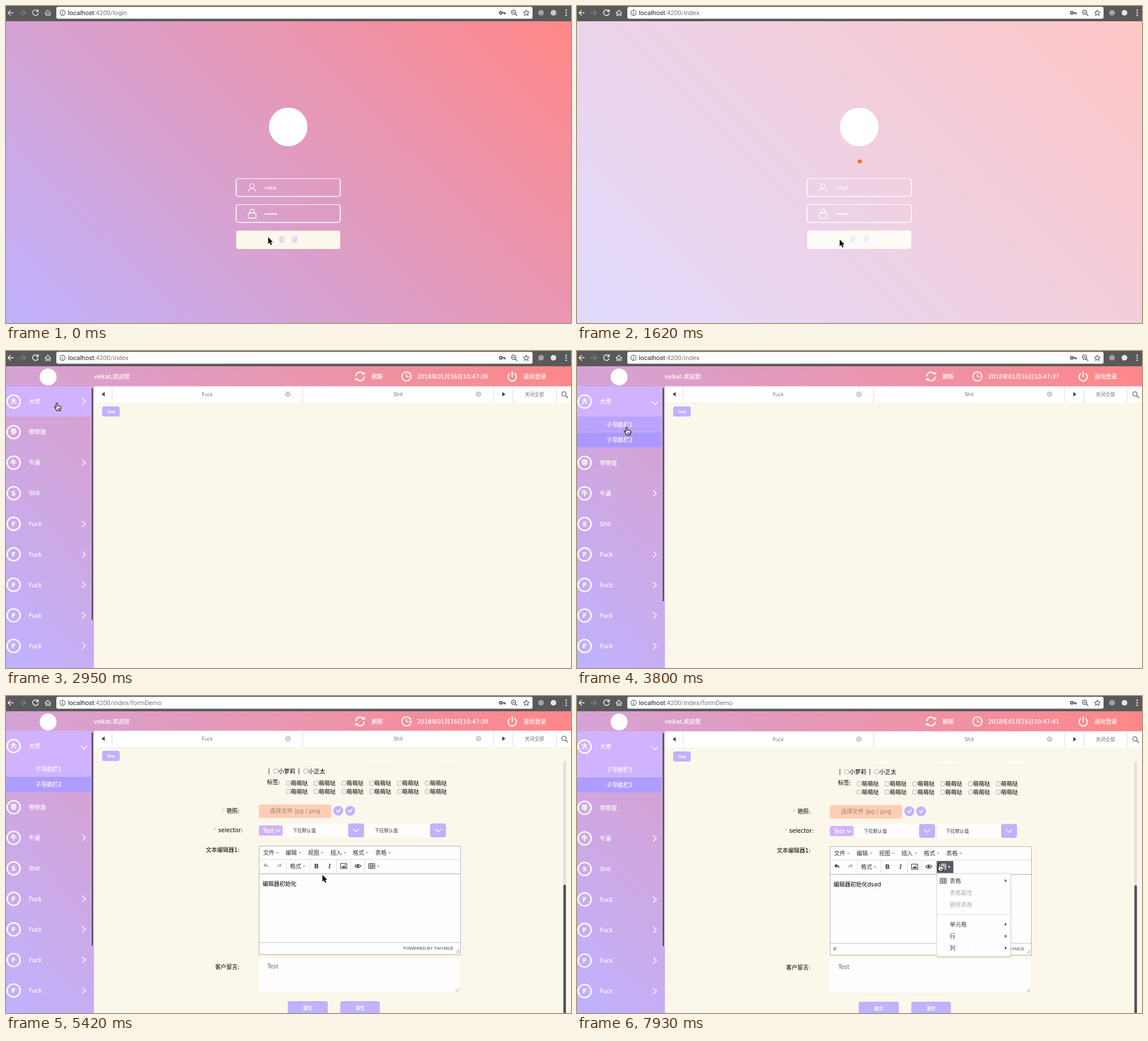
Animation, 999 px wide and 561 px high, one loop 8 s. Source, as an HTML page:

```html
<!DOCTYPE html>
<html lang="zh">
<head>
<meta charset="utf-8">
<title>Admin demo</title>
<style>
html, body { margin: 0; width: 100%; height: 100%; overflow: hidden; }
svg { display: block; width: 999px; height: 561px; }
text { font: 10px "DejaVu Sans", "Noto Sans CJK SC", "Noto Sans CJK", sans-serif; white-space: pre; }
.w { fill: #fff; font-weight: 500; stroke: #fff; stroke-width: .22px; }
.b { font-weight: 700; }
.c { text-anchor: middle; }
.e { text-anchor: end; }
.tab { font-size: 8.6px; fill: #777; }
.s { font: 8.2px "Liberation Sans", "Noto Sans CJK SC", Arial, sans-serif; fill: #666; }
.btn { font: 500 8px "Liberation Sans", "Noto Sans CJK SC", Arial, sans-serif; fill: #fff; text-anchor: middle; stroke: #fff; stroke-width: .25px; }
.url { font: 11.4px Roboto, sans-serif; fill: #222; }
.l { fill: none; stroke-linecap: round; stroke-linejoin: round; }
</style>
</head>
<body>
<svg id="stage" viewBox="0 0 999 561"></svg>
<script>
const USER = 'velkat', PURPLE = '#bfb2ff', CREAM = '#fcf7eb', LIGHT = '#d1b2ff';

const text = (x, y, s, cls = '', more = '') => `<text x="${x}" y="${y}" class="${cls}" ${more}>${s}</text>`;
const rect = (x, y, w, h, fill, r = 0, more = '') =>
  `<rect x="${x}" y="${y}" width="${w}" height="${h}" rx="${r}" fill="${fill}" ${more}/>`;
const dot = (x, y, r, fill, more = '') => `<circle cx="${x}" cy="${y}" r="${r}" fill="${fill}" ${more}/>`;
const line = (d, color, w = 1, more = '') => `<path class="l" d="${d}" stroke="${color}" stroke-width="${w}" ${more}/>`;
const fill = (d, color) => `<path d="${d}" fill="${color}"/>`;
const group = (id, body, more = '') => `<g id="${id}" ${more}>${body}</g>`;
const at = (x, y, body) => `<g transform="translate(${x} ${y})">${body}</g>`;
const vline = (x, y, h, color = '#ddd') => rect(x, y, 1, h, color);

/* Browser bar */
const browserBar = () => rect(0, 0, 999, 27, '#5a595a') +
  group('nav',
    line('M13 12H4M8 7.5L3.5 12 8 16.5', '#f0f0f0', 1.4) +
    line('M56 8.5A5 5 0 1 0 57 13M57 6.5V10H53.5', '#f0f0f0', 1.5) +
    line('M69 12.5L74 7.5 79 12.5M70.5 12V17H73V13.5H75.5V17H78V12', '#f0f0f0', 1.2) +
    dot(968, 12, 5, '#e4e4e4')) +
  line('M25 12H34M30 7.5L34.5 12 30 16.5', '#858585', 1.4) +
  rect(89, 1.5, 842, 21, '#fff', 3) +
  dot(100, 12, 4.6, 'none', 'stroke="#555" stroke-width="1.1"') + line('M100 11.5V14.5M100 9.4V9.6', '#555', 1.2) +
  text(109.5, 16, 'localhost<tspan id="path" fill="#777"></tspan>', 'url') +
  dot(875, 12, 2.2, 'none', 'stroke="#555" stroke-width="2"') + line('M878 12H882.5V14M880.5 12V14', '#555', 1.7) +
  dot(897.5, 11, 3.8, 'none', 'stroke="#555" stroke-width="1.3"') + line('M900.5 14L903.5 17M896 11H899', '#555', 1.4) +
  line('M920 7L921.5 10.5 925 10.8 922.3 13.2 923.2 16.8 920 14.9 916.8 16.8 917.7 13.2 915 10.8 918.5 10.5Z', '#555', 1.1) +
  dot(946, 12, 5, '#a3a3a3') +
  [7.5, 12, 16.5].map(y => dot(990.5, y, 1.4, '#ddd')).join('');

/* Login page */
const field = y => rect(407, y, 184, 31.5, 'none', 4, 'stroke="#fff" stroke-width="1.2"');
const login = () => dot(499, 214, 34, '#fff') +
  field(305.5) + field(351.5) +
  dot(435, 318.5, 4, 'none', 'stroke="#fff" stroke-width="1.2"') + line('M428.5 328C429 321.5 441 321.5 441.5 328', '#fff', 1.2) +
  rect(428.5, 366.5, 13.5, 9, 'none', 1.5, 'stroke="#fff" stroke-width="1.3"') + line('M431.5 366V363.5A3.6 3.6 0 0 1 439 363.5V366', '#fff', 1.3) +
  text(457, 324.8, USER, 's', 'style="fill:#fff"') +
  [0, 1, 2, 3, 4, 5].map(i => dot(459 + 3.7 * i, 368, 1.5, '#fff')).join('') +
  rect(407, 397.5, 184, 32.5, CREAM, 4) +
  ['登', '录'].map((s, i) => text(487.5 + 23 * i, 418, s, 'c', `style="font-size:11.5px;font-weight:500" fill="${PURPLE}"`)).join('') +
  rect(0, 27, 999, 534, '#fff', 0, 'id="veil"') +
  dot(499, 214, 34, '#fff') + field(305.5) + field(351.5) +
  dot(500, 275, 3.6, '#ff6a13', 'id="loader"');

/* Header of the index page */
const header = () => dot(74.5, 46, 15, '#fff') +
  text(155, 48.6, '<tspan id="user"></tspan>,欢迎您', 'w') +
  group('tools',
    at(626, 45, line('M-7.5-1A7.5 7.5 0 0 1 6-4.5M7.5 1A7.5 7.5 0 0 1-6 4.5', CREAM, 2.2) +
      fill('M3-3.5H9V-8.5ZM-3 3.5H-9V8.5Z', CREAM)) +
    text(646.5, 48.6, '刷新', 'w') +
    at(708, 45, dot(0, 0, 8, 'none', `stroke="${CREAM}" stroke-width="2.1"`) + line('M0-4V.5H4', CREAM, 1.7))) +
  text(727, 48.6, '', 'w', 'id="date"') +
  at(895, 45.5, line('M-4.5-5.5A7.3 7.3 0 1 0 4.5-5.5M0-8.5V0', CREAM, 2.2)) +
  text(915, 48.6, '退出登录', 'w');

/* Sidebar */
const menu = ['大佬', '带带我', '牛逼', 'Shit', 'Fuck', 'Fuck', 'Fuck', 'Fuck', 'Fuck'];
const item = (name, i) => {
  const y = 89.5 + 54.05 * i;
  return dot(13.5, y, 11.5, 'none', 'stroke="#fff" stroke-width="2.4"') +
    text(13.5, y + 3.9, name[0], 'w b c', 'style="font-size:10.8px"') +
    text(40.5, y + 3.8, name, 'w') +
    (i === 1 || i === 3 ? '' : line(`M135 ${y - 5}L140.5 ${y}L135 ${y + 5}`, '#fff', 1.4, i ? '' : 'id="chev"'));
};
const sidebar = () => rect(0, 62.5, 150, 53.5, LIGHT, 0, 'id="hot"') +
  item(menu[0], 0) +
  group('sub',
    rect(0, 116, 150, 27.5, LIGHT, 0, 'id="row1"') + rect(0, 143.5, 150, 27.5, LIGHT, 0, 'id="row2"') +
    line('M0 143.5H150', '#fff', .8, 'stroke-dasharray="1 2.5" opacity=".6"') +
    text(52, 133.6, '子导航栏1', 'w') + text(52, 161, '子导航栏2', 'w'), 'clip-path="url(#subClip)"') +
  group('rest', menu.slice(1).map((s, i) => item(s, i + 1)).join('')) +
  rect(150.7, 64.7, 3.8, 412, '#5d4a6c', 1.9, 'id="sideBar" stroke="#fff" stroke-width=".7"');

/* Tab strip and page body */
const closeIcon = x => dot(x, 76.5, 5, '#ccc') + line(`M${x - 1.7} 74.8l3.4 3.4m0-3.4l-3.4 3.4`, '#fff', 1);
const tabs = () => rect(155.5, 62.5, 844, 28.5, '#fff') + rect(155.5, 91, 844, 475, CREAM) +
  fill('M174.5 72.5V80.5L169 76.5Z', '#444') + fill('M877.5 72.5V80.5L883 76.5Z', '#444') +
  [187, 861.5, 896, 972.5].map(x => vline(x, 63, 28)).join('') +
  group('tabNames', text(356, 79.8, 'Fuck', 'tab c') + text(693.5, 79.8, 'Shit', 'tab c')) +
  group('tabExtras', closeIcon(498.5) + closeIcon(835.5) + vline(524, 63, 28)) +
  text(934.5, 80, '关闭全部', 'tab c') +
  dot(986.5, 76, 3.8, 'none', 'stroke="#888" stroke-width="1.7"') + line('M989.5 79L993 82.5', '#888', 2) +
  button(170, 98, 31, 18, 'Test', 110);

/* Form */
const button = (x, y, w, h, s, base) => rect(x, y, w, h, PURPLE, 3.5) + text(x + w / 2, base || y + h / 2 + 2.8, s, 'btn');
const label = (y, s, star, end = 413) =>
  text(end, y + 3.7, (star ? `<tspan fill="${PURPLE}">* </tspan>` : '') + s + ':', 'e', 'style="font-weight:500"');
const input = (x, y, w, s = 'Test', pad = 15) => rect(x, y, w, 24.5, '#fffefd', 3) + text(x + pad, y + 15.2, s, 's');
const check = (x, y, s, dx = 4.5) => rect(x - 3.7, y - 3.7, 7.4, 7.4, '#f3f3f3', 1.5, 'stroke="#aaa" stroke-width=".9"') + text(x + dx, y + 3.7, s);
const bar = (x, y) => text(x, y + 3.5, '|', 'c');
const down = (x, y, k = 5, color = '#fff') => line(`M${x - k} ${y - k / 2}l${k} ${k}l${k} ${-k}`, color, 1.3);
const caret = (x, y, color = '#aaa') => fill(`M${x - 2.5} ${y - 1.2}h5l-2.5 2.6z`, color);
const gridIcon = (x, y, id = '') => `<path ${id} class="l" stroke="#444" d="M${x - 5} ${y - 4.5}h10.5v9h-10.5zm0 3h10.5m-10.5 3h10.5m-7-6v9m3.5-9v9"/>`;
const grip = (x, y) => line(`M${x} ${y}l-6 6m6-3l-3 3`, '#888', .9);

const formTop = () => {
  let s = label(127.5, '门店名称', 1) + input(447, 116, 199) + text(650, 130.5, '这是一个 Tips', '', 'style="font-size:8.8px" fill="#888"');
  for (let i = 1; i < 7; i++) {
    const y = 116 + 34.75 * i;
    s += label(y + 11.8, '名称') + input(447, y, i % 2 ? 355 : 199);
    if (i % 2 === 0) s += button(i === 2 ? 653 : 657, y, 71, 24.5, 'Test');
  }
  s += label(371, '嗯嗯') + label(408, '继续', 1);
  for (let i = 0; i < 4; i++) s += text(461.5, 411.8 + 12.7 * i, '456852');
  s += label(473, '门店名称', 1) + text(461.5, 476.7, 'Test') + label(499.5, '继续', 1) +
    check(465, 495, '图片下显示标题', 9) + bar(550.5, 494) + check(562, 495, '图片下显示概述', 8.5) + bar(647, 494) +
    check(465, 509.2, '图片悬停放大（QV7以上有效）', 9) +
    text(461.5, 537, '每页数量:') + bar(568, 533) + text(575.5, 537, '每页数量:') + bar(682, 533) +
    text(691, 537, `<tspan fill="${PURPLE}">* </tspan>图片尺寸:`);
  return s + [518, 633, 757].map(x => input(x, 522, 42, 'Test', 13)).join('');
};

const select = x => rect(x, 227, 111, 24, '#fffefd', 2) + text(x + 14, 241.8, '下拉默认值', 's', 'style="fill:#333"') +
  rect(x + 112, 226.5, 28, 24.5, PURPLE, 4) + down(x + 126, 239);
const tick = x => dot(x, 204, 8.7, PURPLE) + line(`M${x - 3} 204l2.4 2.6 4-5.4`, '#fff', 1.8);

const editor = () => rect(448, 267.5, 356, 192, '#000', 0, 'opacity=".12"') +
  rect(447.5, 266.5, 356, 192, '#fefefe', 0, 'stroke="#b5b5b5"') +
  rect(448, 290, 355, 1, '#ddd') + rect(448, 315, 355, 1.2, '#b5b5b5') + rect(448, 437, 355, 1, '#c4c4c4') +
  ['文件', '编辑', '视图', '插入', '格式', '表格'].map((s, i) =>
    text(454.5 + 39.7 * i, 282.2, s, '', 'fill="#333"') + caret(480 + 39.7 * i, 278.5)).join('') +
  rect(449.5, 292, 21, 21, '#f2f2f2', 0, 'id="undoHover" stroke="#ccc"') +
  group('undo', fill('M455 300.5L459 296.5V299.2C463 299 464.5 302 463.3 305.5C462.5 302.5 461.5 302 459 302V304.5Z', '#444')) +
  fill('M488 300.5L484 296.5V299.2C480 299 478.5 302 479.7 305.5C480.5 302.5 481.5 302 484 302V304.5Z', '#bbb') +
  [495, 537, 584, 609, 634].map(x => vline(x, 291, 24)).join('') +
  text(502, 306, '格式', '', 'fill="#333"') + caret(527, 302.5) +
  text(549, 306, 'B', 'b c', 'fill="#444" style="font-size:11px"') +
  text(572, 306, 'I', 'c', 'fill="#444" style="font:italic 700 12px \'Liberation Serif\',serif"') +
  rect(591.5, 297.5, 11, 9, 'none', 0, 'stroke="#444" stroke-width="1.1"') + fill('M593 305L596 301 598 303 599.5 301.5 601.5 305Z', '#444') + dot(599.5, 300, 1, '#444') +
  line('M616.5 302Q622 295.5 627.5 302Q622 307.5 616.5 302Z', '#444', 1.2) + dot(622, 301.6, 2.1, '#444') +
  rect(636, 292, 29.5, 21.5, '#555c66', 0, 'id="tableOn"') + gridIcon(646.5, 302, 'id="tableIcon"') + group('tableCaret', caret(658, 302.5, 'currentColor')) +
  text(453.5, 336.7, '编辑器初始化<tspan id="typed"></tspan>') +
  rect(513.5, 328, 1, 11, '#000', 0, 'id="caret"') +
  text(453.5, 450.6, 'P', 's', 'id="status" style="fill:#333"') +
  text(702.5, 449.9, 'POWERED BY TINYMCE', 's', 'style="font-size:7.7px;fill:#444"') + grip(801.5, 449.5);

const popup = () => {
  const rows = [['表格', 327, 1], ['表格属性', 348], ['删除表格', 369], ['单元格', 404, 1], ['行', 425, 1], ['列', 446, 1]];
  return rect(637, 316, 131, 147, '#000', 0, 'opacity=".12"') +
    rect(636, 314, 131, 147, '#fff', 0, 'stroke="#ccc"') + rect(637, 386, 129, 1, '#ddd') + gridIcon(647.5, 327) +
    rows.map(([s, y, on]) => text(659, y + 3.7, s, '', `fill="${on ? '#333' : '#aaa'}"`) +
      (on ? fill(`M756.5 ${y - 3}l3.5 3-3.5 3z`, '#444') : '')).join('');
};

const formBottom = () => {
  let s = bar(465, 133) + check(477, 134, '小萝莉') + bar(518, 133) + check(530, 134, '小正太') + text(461.5, 157.2, '标签:');
  for (let i = 0; i < 12; i++) s += check(499 + 49.2 * (i % 6), i < 6 ? 155.5 : 170, '萌萌哒');
  return s + label(204, '艳照', 1) + rect(447, 193, 128, 24, '#ffcdb3', 3.5) +
    text(511, 208, '选择文件 jpg / png', 'c', 'fill="#94847c" style="font-size:10.2px"') + tick(587.5) + tick(608.5) +
    label(238.5, 'selector', 1, 418.5) + rect(447, 230, 42, 18, LIGHT, 3.5) + text(454, 242.7, 'Test', 'w') + down(481, 239.5, 3.6) +
    select(493) + select(638) + label(273, '文本编辑器1') + editor() +
    label(480, '客户留言') + rect(447, 466, 355, 59, '#fffefd', 3) + text(462, 483, 'Test', '', 'fill="#666"') + grip(801, 518.5) +
    group('popup', popup());
};

const form = () =>
  `<g clip-path="url(#formClip)">${group('scroller', formTop() + at(0, 428, formBottom()))}</g>` +
  button(498, 541, 71, 26, '提交', 556) + button(591, 541, 70, 26, '清空', 556) +
  rect(985.5, 116, 4.6, 450, '#e3dfd8', 2) + rect(985.5, 116, 4.6, 231, '#555056', 2.3, 'id="thumb"');

const pointers =
  group('arrow', '<path d="M0 0V12L2.7 9.5 4.7 14 6.7 13.1 4.8 8.8H8.4Z" stroke="#fff" stroke-width="1.5" paint-order="stroke"/>') +
  group('hand', '<path d="M-1.3 1.2C-1.3-.5 1.2-.5 1.2 1.2V5L4.2 5.5 6.4 6.3C7.4 6.8 7.5 7.5 7.3 8.6L6.5 11.8 5.6 13.8H-.2L-1.8 11 -4.2 7.8C-4.8 6.8-3.6 5.8-2.6 6.6L-1.3 7.8Z" fill="#fff" stroke="#000" stroke-width="1.1"/><path class="l" stroke="#000" stroke-width=".8" d="M1.5 9.3V12M3.2 9.3V12M4.9 9.3V12"/>') +
  group('beam', line('M-2.5-7.5Q0-7.5 0-5.5Q0-7.5 2.5-7.5M0-5.5V5.5M-2.5 7.5Q0 7.5 0 5.5Q0 7.5 2.5 7.5', '#222', 1.1));

const stage = document.getElementById('stage');
stage.innerHTML = `<defs>
  <linearGradient id="bg" gradientUnits="userSpaceOnUse" x1="116.25" y1="677.25" x2="882.75" y2="-89.25">
    <stop stop-color="${PURPLE}"/><stop offset="1" stop-color="#ff8787"/></linearGradient>
  <clipPath id="subClip"><rect id="subBox" y="116" width="156" height="0"/></clipPath>
  <clipPath id="formClip"><rect x="156" y="116" width="843" height="450"/></clipPath></defs>` +
  rect(0, 27, 999, 534, 'url(#bg)') +
  group('login', login()) +
  group('index', header() + group('low', sidebar() + tabs() + group('form', form()))) +
  browserBar() + group('cursor', pointers);

/* Each step overrides part of the state: time, pointer [x, y, shape], changes */
const steps = [
  [0, [463.5, 409, 'arrow'], { path: '/login', nav: .82, veil: 0, loader: 0, index: 0, user: 0, tab: 0, hot: 0, open: 0, row1: LIGHT, row2: LIGHT,
    form: 0, scroll: 0, lift: 0, typed: '', status: 0, caret: 0, undoHover: 0, tableOn: 0, popup: 0 }],
  [120, [460.5, 409]], [340, [462, 411]], [560, [464.5, 413.3]],
  [830, 0, { path: '/index', nav: 1, loader: 1 }],
  [1180, 0, { veil: .18 }], [1400, 0, { veil: .38 }], [1620, 0, { veil: .53 }],
  [1770, 0, { index: 1 }],
  [2040, 0, { user: 1, tab: .4 }], [2220, [440, 390], { tab: .8 }], [2400, [330, 295], { tab: 1 }],
  [2590, [200, 180]], [2770, [120, 110], { hot: .5 }], [2950, [90, 92, 'hand'], { hot: 1 }],
  [3330, 0, { open: .3 }], [3490, [89, 108], { open: .75 }],
  [3650, [88, 146], { open: 1, row2: '#ab98ff' }], [3800, [88, 135], { row1: '#b9a3ff' }],
  [4070, [92, 151], { row1: LIGHT, row2: '#ae9cff' }], [4235, [95, 155]],
  [4400, [250, 220, 'arrow'], { path: '/index/formDemo', form: .4 }], [4565, [450, 290], { form: .8 }], [4730, [559.5, 316.5], { form: 1 }],
  [5270, 0, { scroll: 190 }], [5420, 0, { scroll: 428, lift: 1 }], [5600, 0, { lift: 0 }],
  [5930, [535, 345, 'beam']], [6130, [513, 368]],
  [6400, 0, { status: 1, caret: 1 }], [6525, 0, { typed: 'd' }], [6650, 0, { typed: 'ds' }], [6775, 0, { typed: 'dsa' }], [6900, 0, { typed: 'dsad' }],
  [7025, [510, 355]], [7150, [500, 335]], [7275, [488, 322], { caret: 0 }], [7400, [472, 310, 'arrow']],
  [7550, [460, 304], { undoHover: 1 }], [7677, [570, 302], { undoHover: 0 }],
  [7803, [641, 296.5, 'hand'], { tableOn: 1, popup: .4 }], [7930, 0, { popup: .94 }]
];

const $ = id => document.getElementById(id);
const set = (id, name, v) => $(id).setAttribute(name, v);
const show = (id, v) => { $(id).style.opacity = v; $(id).style.display = v ? '' : 'none'; };
const move = (id, x, y) => set(id, 'transform', `translate(${x} ${y})`);

function render(n) {
  const s = {};
  let x, y, shape;
  for (const [, p, change] of steps.slice(0, n + 1)) {
    if (p) { [x, y] = p; shape = p[2] || shape; }
    Object.assign(s, change);
  }
  move('cursor', x, y);
  for (const id of ['arrow', 'hand', 'beam']) show(id, +(id === shape));
  for (const id of ['nav', 'veil', 'loader', 'index', 'hot', 'form', 'status', 'caret', 'undoHover', 'tableOn', 'popup']) show(id, s[id]);
  show('login', 1 - s.index);
  $('path').textContent = ':4200' + s.path;

  const sec = 33 + Math.floor((steps[n][0] + 400) / 1000);
  $('user').textContent = s.user ? USER : '';
  $('date').textContent = s.user ? `2018年01月16日10:47:${sec}` : '';
  move('tools', s.user ? 0 : 131.3, 0);
  show('tabNames', .25 + .75 * s.tab);
  show('tabExtras', s.tab);

  set('subBox', 'height', 54.5 * s.open);
  move('rest', 0, 54.3 * s.open);
  set('sideBar', 'height', 412 - 33 * s.open);
  set('chev', 'transform', `translate(0 ${3 * s.open}) rotate(${90 * s.open} 137.8 89.5)`);
  set('row1', 'fill', s.row1);
  set('row2', 'fill', s.row2);

  move('low', 0, -s.lift);
  move('scroller', 0, -s.scroll);
  set('thumb', 'y', 116 + s.scroll * 219 / 428);
  $('typed').textContent = s.typed;
  set('caret', 'x', 513.5 + 6 * s.typed.length);
  show('undo', s.typed ? 1 : .45);
  set('tableIcon', 'stroke', s.tableOn ? '#fff' : '#444');
  $('tableCaret').style.color = s.tableOn ? '#fff' : '#aaa';
}

const start = performance.now();
let shown = -1;
function tick_() {
  const t = (performance.now() - start) % 8000;
  const n = steps.filter(step => step[0] <= t).length - 1;
  if (n !== shown) render(shown = n);
  requestAnimationFrame(tick_);
}
tick_();
</script>
</body>
</html>
```
